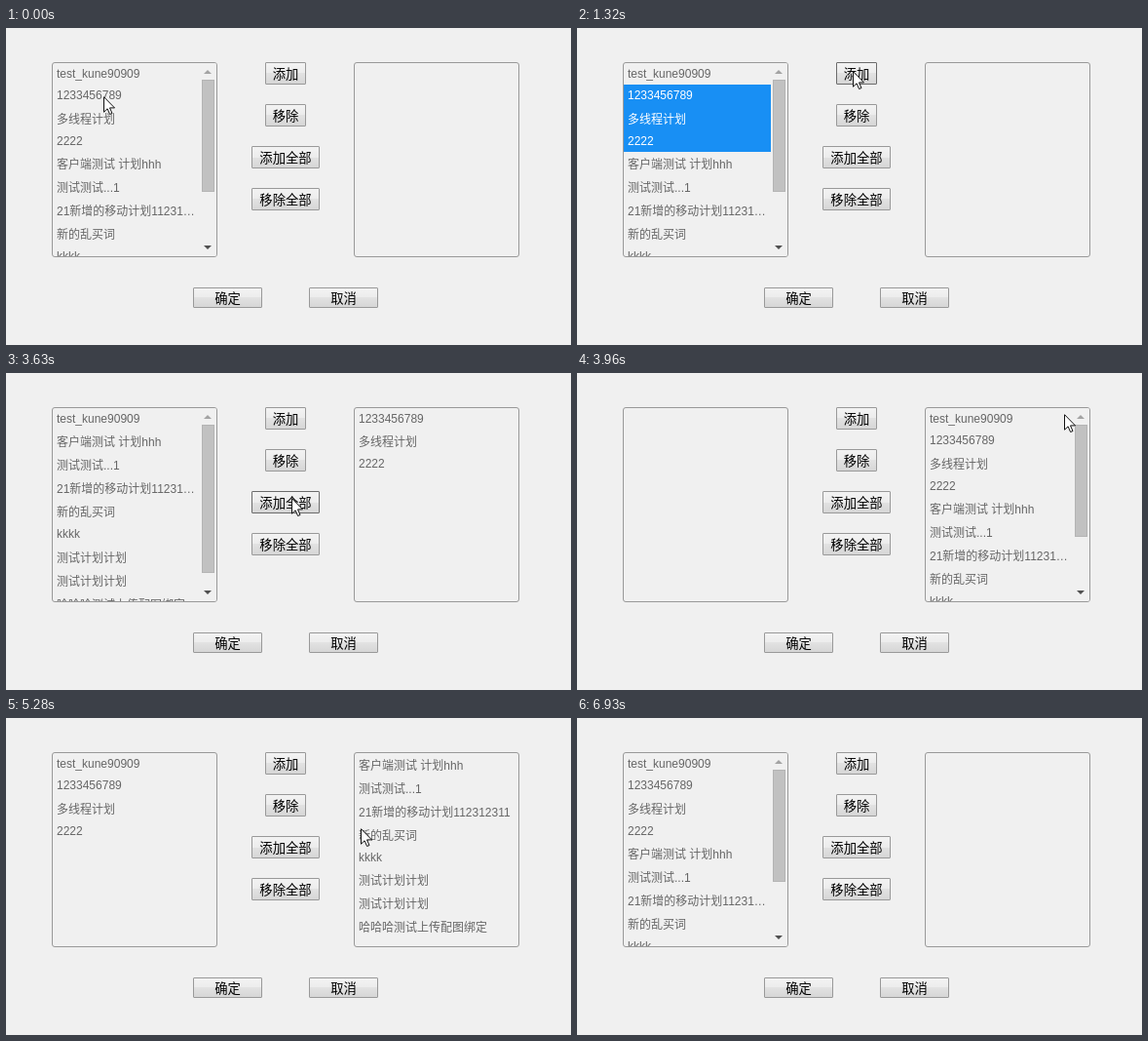
An HTML page that plays this animation: 580 by 325 pixels, repeating every 7260 ms.

```html
<!DOCTYPE html>
<html lang="zh-CN">
<head>
<meta charset="utf-8">
<title>计划选择</title>
<style>
html, body { margin: 0; width: 100%; height: 100%; overflow: hidden; background: #f0f0f0; }
body { position: relative; font-family: "Liberation Sans", Arial, "Noto Sans CJK SC", "Noto Sans CJK", sans-serif; }
.list, .btn, .bar, .bar *, #cursor { position: absolute; box-sizing: border-box; }
.list { top: 35px; width: 170px; height: 200px; border: 1px solid #999; border-radius: 3px; overflow: hidden; }
.row { height: 24px; line-height: 26px; padding: 0 4px; font-size: 12px; color: #666;
  white-space: nowrap; overflow: hidden; text-overflow: ellipsis; }
.row.latin { height: 22.4px; line-height: 22px; }
.row.on { background: #188ff4; color: #fff; }
.scroll .row { margin-right: 17px; }
.bar { right: 0; top: 0; width: 17px; height: 198px; background: #f0f0f0; }
.thumb { left: 2px; top: 17px; width: 13px; background: #c1c1c1; border: 1px solid #b4b4b4; }
.up, .down { left: 4px; border: 4px solid transparent; }
.up { top: 3px; border-bottom-color: #a3a3a3; }
.down { top: 187px; border-top-color: #505050; }
.btn { border: 1px solid #999; border-radius: 1px; font-size: 13.33px; text-align: center; color: #000;
  background: linear-gradient(#f3f3f3, #ececec 50%, #e2e2e2 50%, #d6d6d6); }
.btn.hover { border-color: #6c6c6c; }
#cursor { left: 0; top: 0; }
</style>
</head>
<body>
<div class="list" style="left:47px"></div>
<div class="list" style="left:357px"></div>
<svg id="cursor" width="13" height="20"><path d="M.5 .7V16.2L4.1 12.8L6.6 18.5L9 17.5L6.5 11.9H11.5Z" fill="#fff" stroke="#111"/></svg>
<script>
const STEP = 330, LOOP = 7260;
const items = ["test_kune90909", "1233456789", "多线程计划", "2222", "客户端测试 计划hhh", "测试测试...1",
  "21新增的移动计划112312311", "新的乱买词", "kkkk", "测试计划计划", "测试计划计划", "哈哈哈测试上传配图绑定"];
const buttons = [["添加", 266, 35, 42, 23], ["移除", 266, 78, 42, 23], ["添加全部", 252, 121, 70, 23],
  ["移除全部", 252, 164, 70, 23], ["确定", 192, 266, 71, 21], ["取消", 311, 266, 71, 21]];
// pointer position at each step; hidden on the last one
const path = [[100, 70], [97, 77], [118, 126], [266, 67], [283, 44], [283, 44], [283, 44], [285, 97],
  [431, 33], [249, 76], [146, 81], [293, 128], [500, 42], [400, 125], [292, 109], [286, 98],
  [364, 113], [289, 157], [287, 172], [284, 195], [284, 212]];
const hovers = { 4: 0, 5: 0, 6: 0, 7: 1, 11: 2, 15: 1, 17: 2, 18: 3 };

const lists = document.querySelectorAll(".list");
const cursor = document.getElementById("cursor");
const buttonEls = buttons.map(([label, x, y, w, h]) => {
  const el = document.createElement("div");
  el.className = "btn";
  el.textContent = label;
  el.style.cssText = `left:${x}px;top:${y}px;width:${w}px;height:${h}px;line-height:${h}px`;
  document.body.insertBefore(el, cursor);
  return el;
});

const isLatin = s => /^\w+$/.test(s);
const picked = i => i > 0 && i < 4;

function onRight(i, step) {
  if (step < 6 || step > 18) return false;
  if (step < 12) return picked(i);
  return step < 16 || i > 3;
}

function isSelected(i, step) {
  return step > 1 && step < 6 ? picked(i) : step > 12 && step < 16 && i < 4;
}

function fillList(el, side, step) {
  let html = "", height = 0;
  items.forEach((text, i) => {
    if (onRight(i, step) !== side) return;
    const latin = isLatin(text);
    height += latin ? 22.4 : 24;
    html += `<div class="row${latin ? " latin" : ""}${isSelected(i, step) ? " on" : ""}">${text}</div>`;
  });
  const scroll = height > 198;
  if (scroll) {
    const size = Math.floor(164 * 198 / height);
    html += `<div class="bar"><i class="up"></i><i class="thumb" style="height:${size}px"></i><i class="down"></i></div>`;
  }
  el.classList.toggle("scroll", scroll);
  el.innerHTML = html;
}

let shown = -1;
function draw(now) {
  const step = Math.floor(now % LOOP / STEP);
  if (step === shown) return;
  shown = step;
  lists.forEach((el, n) => fillList(el, n === 1, step));
  buttonEls.forEach((el, n) => el.classList.toggle("hover", hovers[step] === n));
  const at = path[step];
  cursor.style.display = at ? "" : "none";
  if (at) cursor.style.transform = `translate(${at[0]}px,${at[1]}px)`;
}

let start;
function tick(now) {
  start ??= now;
  draw(now - start);
  requestAnimationFrame(tick);
}
draw(0);
requestAnimationFrame(tick);
</script>
</body>
</html>
```
